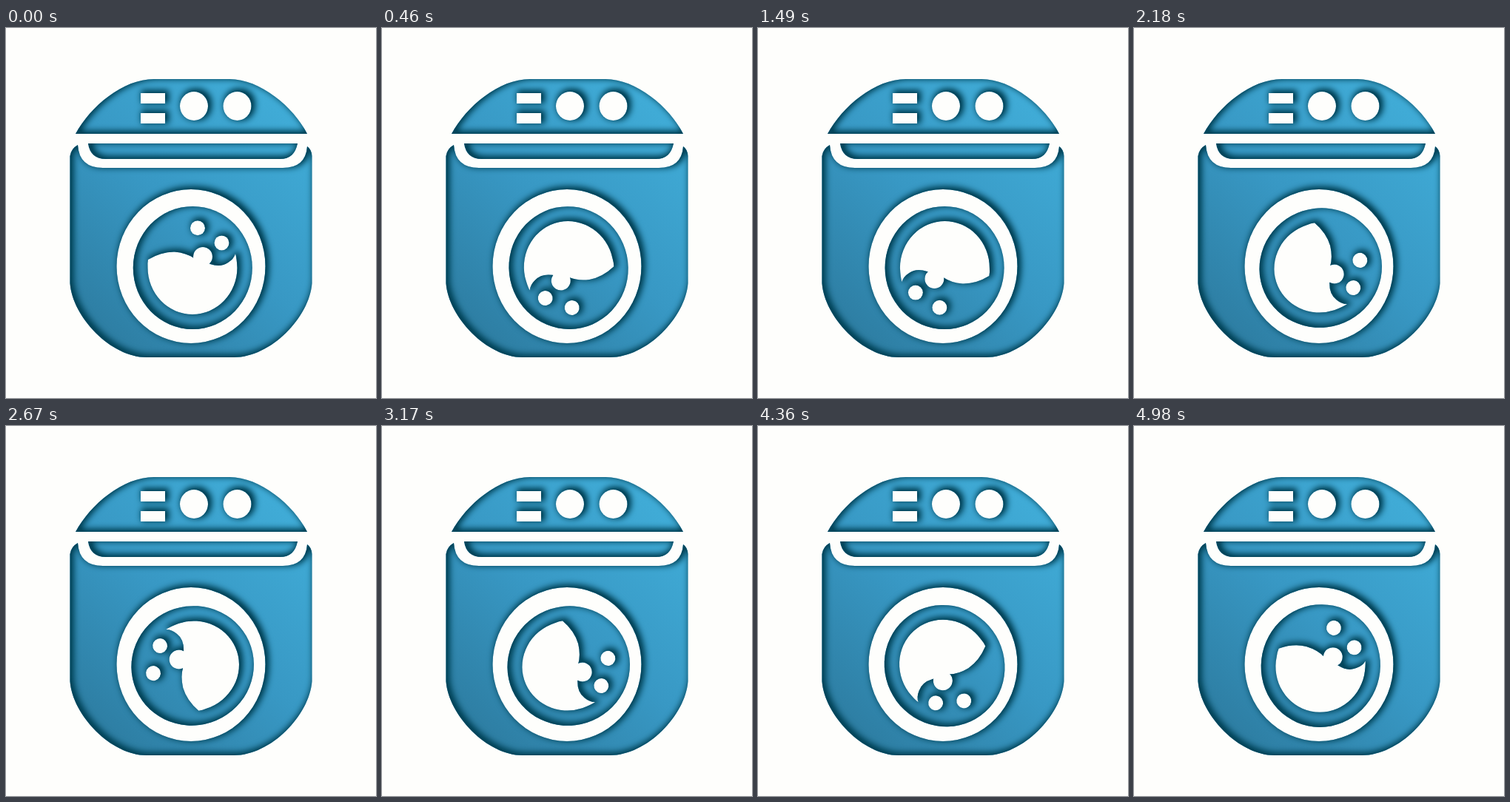
Animation of 500x500 px, one loop 5010 ms. Source, as an HTML page:

```html
<!DOCTYPE html>
<html lang="en">
<head>
<meta charset="utf-8">
<title>Washing machine</title>
<style>
  html, body { margin: 0; width: 100%; height: 100%; overflow: hidden; background: #fefefc; }
  svg { display: block; width: 100%; height: 100%; }
</style>
</head>
<body>
<svg viewBox="0 0 500 500">
  <defs>
    <linearGradient id="metal" gradientUnits="userSpaceOnUse" x1="400" y1="100" x2="110" y2="430">
      <stop offset="0" stop-color="#41aed9"/>
      <stop offset=".5" stop-color="#3898c4"/>
      <stop offset="1" stop-color="#2c7a9e"/>
    </linearGradient>

    <!-- Dark inner edge, pushed up and to the right -->
    <filter id="emboss" filterUnits="userSpaceOnUse" x="0" y="0" width="500" height="500" color-interpolation-filters="sRGB">
      <feComponentTransfer in="SourceAlpha">
        <feFuncA type="linear" slope="-1" intercept="1"/>
      </feComponentTransfer>
      <feMorphology operator="dilate" radius="2"/>
      <feGaussianBlur stdDeviation="4"/>
      <feOffset dx="2.5" dy="-2.5"/>
      <feComponentTransfer result="edge">
        <feFuncA type="linear" slope="1.2"/>
      </feComponentTransfer>
      <feFlood flood-color="#03465c"/>
      <feComposite in2="edge" operator="in"/>
      <feComposite in2="SourceAlpha" operator="in" result="shade"/>
      <feMerge>
        <feMergeNode in="SourceGraphic"/>
        <feMergeNode in="shade"/>
      </feMerge>
    </filter>

    <mask id="machine" maskUnits="userSpaceOnUse" x="0" y="0" width="500" height="500">
      <g fill="#fff">
        <path d="M94 143C114 106 158 69 200 69H302C343 69 388 106 407 143Z"/>
        <path d="M111 156H394C391 170 384 177 370 177H135C121 177 113 170 111 156Z"/>
        <path d="M97 158Q99 189 131 189H374Q405 189 407 160Q413 164 413.5 173V345C410 391 358 445 308 445H190C142 445 90 391 86.5 345V173Q88 163 97 158Z"/>
      </g>
      <rect x="182" y="88" width="33" height="14"/>
      <rect x="182" y="115" width="33" height="14"/>
      <ellipse cx="254" cy="105.5" rx="19" ry="19.5"/>
      <ellipse cx="312.5" cy="105.5" rx="19" ry="19.5"/>
      <ellipse cx="250" cy="322" rx="100.5" ry="104"/>
      <g id="drum">
        <ellipse cx="252.3" cy="324" rx="80.5" ry="83" fill="#fff"/>
        <path d="M192 313Q210 302 228 302.5Q244 304 254 311L276 319Q290 324 300 317Q308 312 310 305Q312 312 312.5 324A60.5 63 0 0 1 191.5 324Q191 318 192 313Z"/>
        <circle cx="266" cy="309" r="13"/>
        <circle cx="259" cy="270.3" r="10"/>
        <circle cx="291.5" cy="290.4" r="10"/>
      </g>
    </mask>
  </defs>

  <rect width="500" height="500" fill="#fefefc"/>
  <g filter="url(#emboss)">
    <rect width="500" height="500" fill="url(#metal)" mask="url(#machine)"/>
  </g>
</svg>
<script>
  const LOOP = 5010;
  const STEP = 33;
  const LAST_STEP = 151;
  const DEGREES_PER_STEP = 12;
  const drum = document.getElementById('drum');
  const start = performance.now();

  function render(ms) {
    // Steps fall on multiples of 10 ms
    const tick = Math.floor((ms % LOOP) / 10) * 10;
    const step = Math.min(LAST_STEP, Math.floor((tick + 4.99) / STEP));
    drum.setAttribute('transform', `rotate(${step * DEGREES_PER_STEP % 360} 252.2 324)`);
  }

  function loop() {
    render(performance.now() - start);
    requestAnimationFrame(loop);
  }

  render(0);
  requestAnimationFrame(loop);
</script>
</body>
</html>
```
